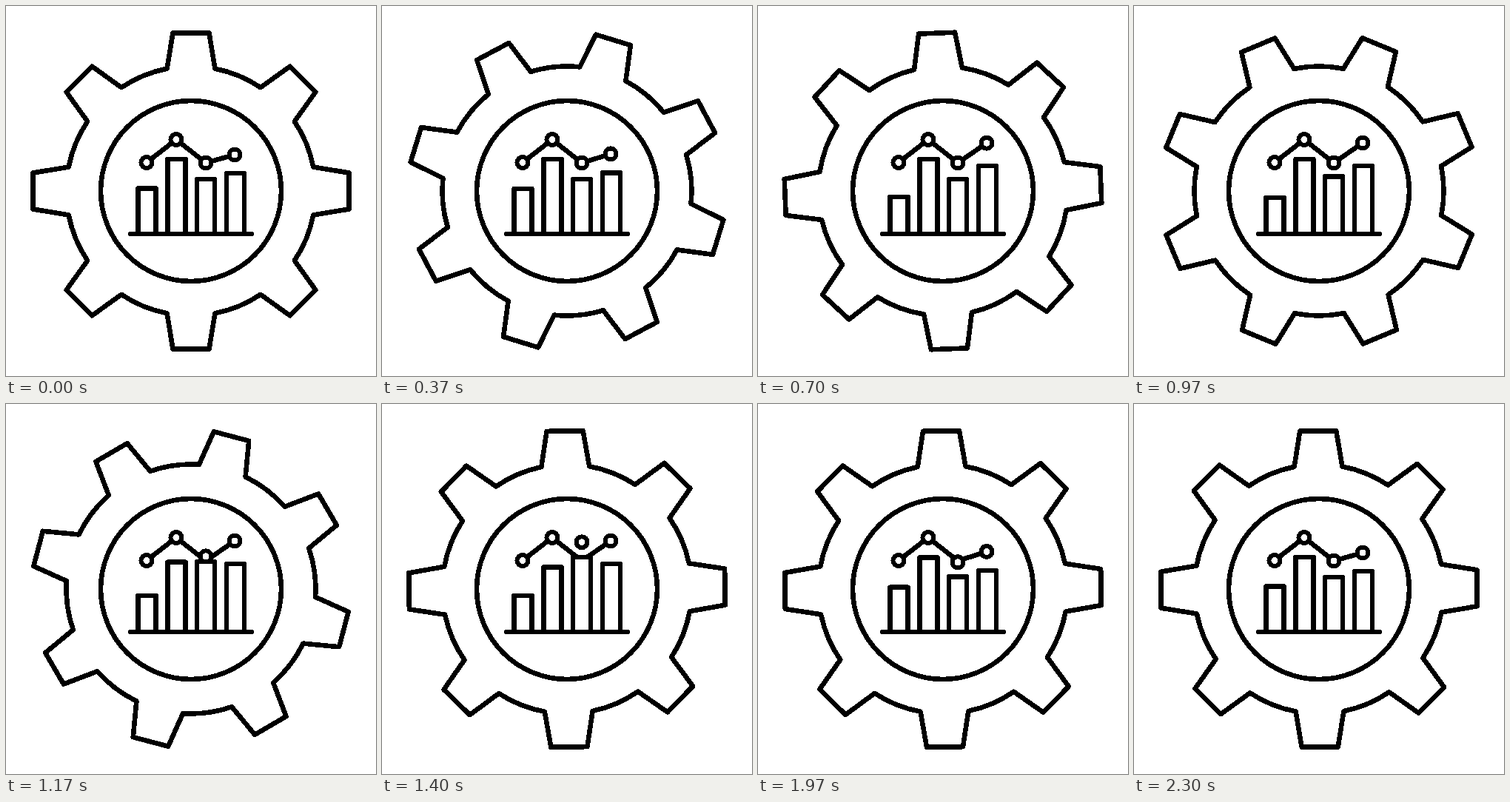
An HTML page that plays this animation: 500x500 px, repeating every 2.33 s.

```html
<!DOCTYPE html>
<html lang="en">
<head>
<meta charset="utf-8">
<title>Gear with chart</title>
<style>
  html, body { margin: 0; width: 100%; height: 100%; overflow: hidden; background: #fff; }
  svg { display: block; width: 100%; height: 100%; shape-rendering: crispEdges; }
  svg * { fill: #fff; stroke: #000; stroke-width: 6.6; stroke-linecap: round; stroke-linejoin: round; }
  #trend { fill: none; }
</style>
</head>
<body>
<svg viewBox="0 0 500 500">
  <path id="gear"/>
  <circle cx="250" cy="250" r="122"/>
  <path id="trend"/>
  <g id="dots"></g>
  <g id="bars"></g>
  <path d="M168 308H332"/>
</svg>
<script>
const LOOP = 2330, FPS = 30;
const $ = id => document.getElementById(id);

function add(parent, tag, attrs) {
  const el = document.createElementNS('http://www.w3.org/2000/svg', tag);
  for (const key in attrs) el.setAttribute(key, attrs[key]);
  return parent.appendChild(el);
}

const polar = (r, deg) => {
  const a = deg * Math.PI / 180;
  return `${250 + r * Math.sin(a)} ${250 - r * Math.cos(a)}`;
};

function gearPath() {
  let d = '';
  for (let a = 0; a < 360; a += 45) {
    d += `${a ? 'L' : 'M'}${polar(168.5, a - 11.1)}L${polar(214.9, a - 6.55)}` +
         `L${polar(214.9, a + 6.55)}L${polar(168.5, a + 11.1)}` +
         `A168.5 168.5 0 0 1 ${polar(168.5, a + 33.9)}`;
  }
  return d + 'Z';
}

const progress = (n, from, to) => Math.min(1, Math.max(0, (n - from) / (to - from)));
const smooth = u => u * u * (3 - 2 * u);
const ramp = (n, from, to) => smooth(progress(n, from, to));
// Leaves rest during [a, b] and comes back during [c, d]
const bump = (n, a, b, c, d) => ramp(n, a, b) - ramp(n, c, d);

// Cubic ease with horizontal handles of length a and b
function ease(x, a, b) {
  let lo = 0, hi = 1;
  for (let i = 0; i < 24; i++) {
    const s = (lo + hi) / 2, r = 1 - s;
    if (3 * a * s * r * r + 3 * (1 - b) * s * s * r + s * s * s < x) lo = s; else hi = s;
  }
  return smooth(lo);
}

$('gear').setAttribute('d', gearPath());
const dots = [[190, 211.5], [230, 180.5], [270, 212], [309, 201]]
  .map(([cx, cy]) => add($('dots'), 'circle', { cx, cy, r: 7.5, style: 'stroke-width:6' }));
const bars = [190.5, 230.5, 270, 310]
  .map(x => add($('bars'), 'rect', { x: x - 12, width: 24 }));

function draw(n) {
  // One full turn that slightly overshoots, then creeps back
  const angle = -360.7 * ease(progress(n, .85, 58), .331, .229) + .4 * progress(n, 58, 70);
  $('gear').setAttribute('transform', `rotate(${angle} 250 250)`);

  const outer = bump(n, 9, 21.8, 48.5, 61.5);
  const tops = [
    246.5 + 12.5 * bump(n, 9, 23.5, 48.5, 61.5),
    207 + 13.5 * bump(n, 28, 42, 50, 60),
    234 - 27 * bump(n, 26, 39, 50, 60),
    226 - 10 * outer
  ];
  bars.forEach((bar, i) => {
    bar.setAttribute('y', tops[i]);
    bar.setAttribute('height', 308 - tops[i]);
  });

  const lastY = 201 - 16 * outer;
  const settle = 2.7 * bump(n, 50, 60, 60, 69);
  dots[2].setAttribute('cy', 212 - 27 * bump(n, 31, 44, 50, 60) + settle);
  dots[3].setAttribute('cy', lastY);
  $('trend').setAttribute('d', `M190 211.5L230 180.5L270 212L309 ${lastY}`);
}

function tick() {
  draw(Math.floor((performance.now() % LOOP + 3.4) * FPS / 1000));
  requestAnimationFrame(tick);
}
tick();
</script>
</body>
</html>
```
